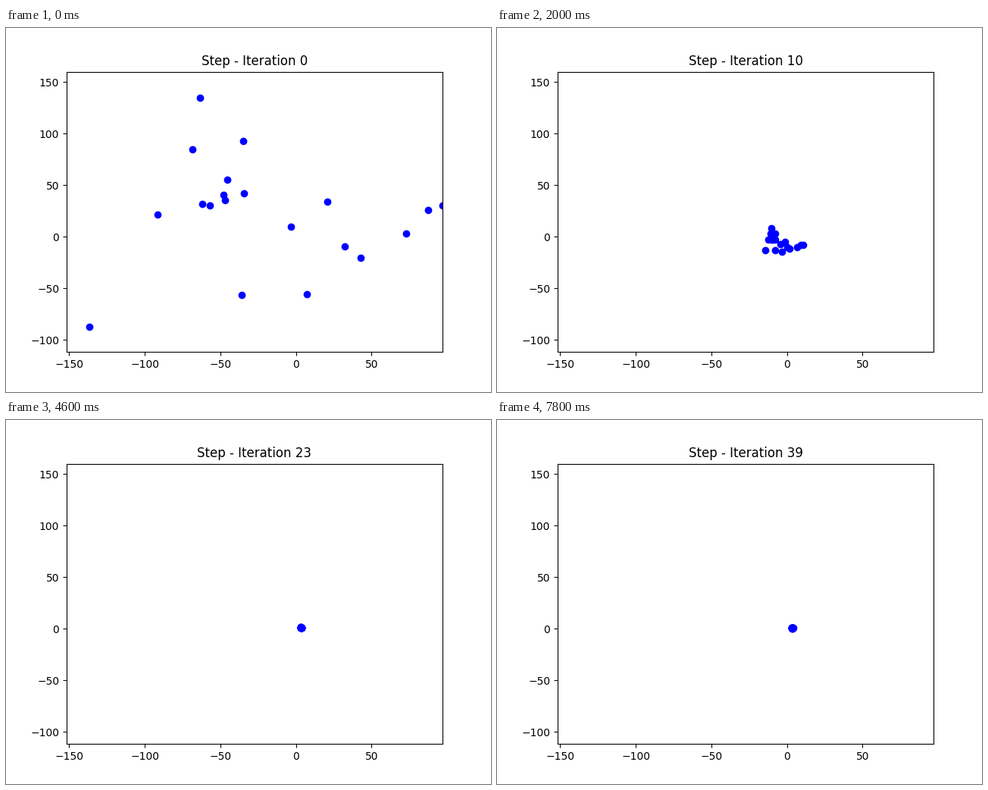
A matplotlib script that plays this animation: 640x480 px, repeating every 8 s.

```python
import numpy as np
import matplotlib.pyplot as plt
from matplotlib.animation import FuncAnimation

STEPS = 40
FLOOR = 0.003     # remaining spread once converged
SETTLE = 6        # iterations until the swarm is fully skewed
BEND, SHEAR = 0.003, 0.3

START = np.array([
    (-63.4, 134.7), (-68.4, 85.0), (-34.8, 92.8), (-45.4, 55.3),
    (-47.9, 40.6), (-46.9, 35.5), (-34.3, 42.1), (-61.9, 31.8),
    (-56.9, 30.3), (-91.5, 21.5), (-3.3, 9.7), (20.8, 34.0),
    (32.3, -9.4), (42.9, -20.4), (72.9, 3.1), (87.5, 25.9),
    (96.9, 30.3), (-35.8, -56.4), (7.3, -55.7), (-136.6, -87.3),
])
MEAN = START.mean(axis=0)

# Path of the swarm's centre
TIMES = np.array([0, 6, 10, 18, 28, 39])
CENTRES = np.array([MEAN, (-20, -12), (-5, -5),
                    (3.4, 1.4), (3.5, 1.2), (3.5, 0.9)])
SLOPES = np.gradient(CENTRES, TIMES, axis=0)
SLOPES[3:] = 0


def centre(k):
    """Cubic Hermite curve through the key centres."""
    i = min(np.searchsorted(TIMES, k, side="right") - 1, len(TIMES) - 2)
    w = TIMES[i + 1] - TIMES[i]
    t = (k - TIMES[i]) / w
    return ((1 + 2 * t) * (1 - t) ** 2 * CENTRES[i]
            + t * (1 - t) ** 2 * w * SLOPES[i]
            + t * t * (3 - 2 * t) * CENTRES[i + 1]
            + t * t * (t - 1) * w * SLOPES[i + 1])


def shape(k):
    """Deviations from the centre, bent and sheared as the swarm turns."""
    amount = min(k / SETTLE, 1)
    x, y = (START - MEAN).T
    bend = x ** 2 - np.mean(x ** 2)
    return np.column_stack([x + amount * BEND * bend, y - amount * SHEAR * x])


def positions(k):
    spread = np.exp(-0.195 * k - 0.0027 * k * k)
    return centre(k) + shape(k) * max(spread, FLOOR)


fig, ax = plt.subplots(figsize=(6.4, 4.8), dpi=100)
dots = ax.scatter(*positions(0).T, color="blue")
ax.set_xlim(-151.75, 96.9)
ax.set_ylim(-111.6, 160.2)
title = ax.set_title("Step - Iteration 0")


def update(k):
    dots.set_offsets(positions(k))
    title.set_text(f"Step - Iteration {k}")
    return dots, title


anim = FuncAnimation(fig, update, frames=STEPS, interval=200,
                     repeat=True, repeat_delay=0)
plt.show()
```
